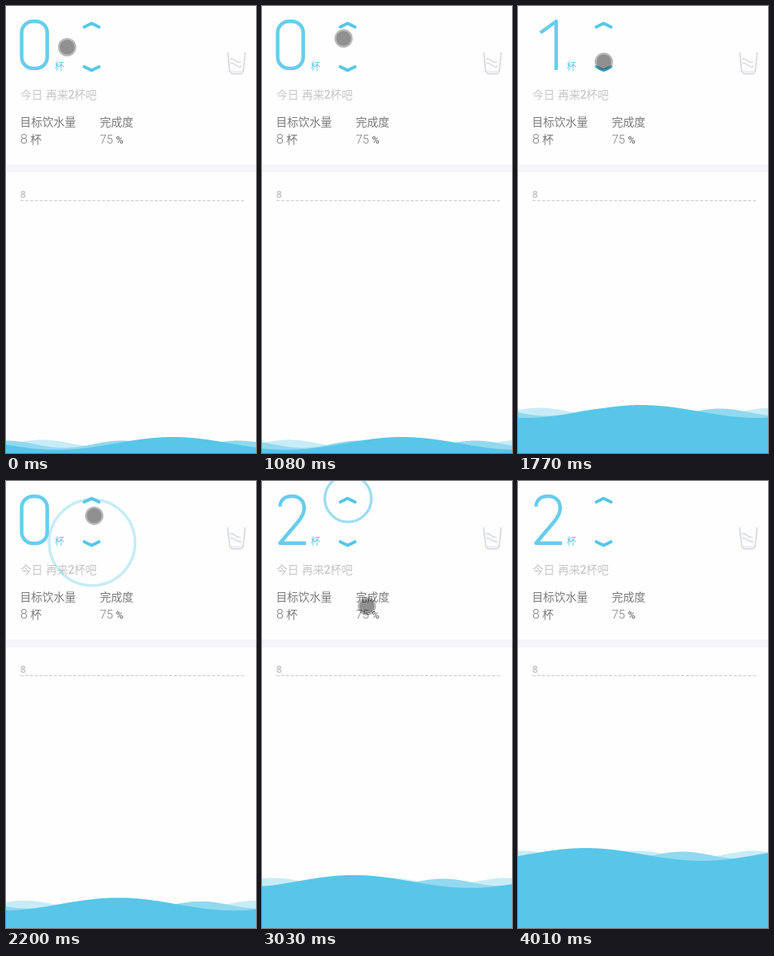
An HTML page with a canvas that plays this animation: 313x559 px, repeating every 4.04 s.

```html
<!DOCTYPE html>
<html lang="zh-CN">
<head>
<meta charset="utf-8">
<title>饮水记录</title>
<style>
  html, body { margin: 0; width: 100%; height: 100%; overflow: hidden; background: #fefefe; }
  canvas { display: block; width: 313px; height: 559px; }
</style>
</head>
<body>
<canvas id="stage"></canvas>
<script>
const W = 313, H = 559, LOOP = 4040;
const BLUE = '#58c6e8', DIGIT = '#68cdec';
const CJK = '"Noto Sans CJK SC", "Noto Sans CJK", sans-serif';
const LATIN = 'Roboto, "Noto Sans", sans-serif';

const canvas = document.getElementById('stage');
const ctx = canvas.getContext('2d');
const dpr = window.devicePixelRatio || 1;
canvas.width = W * dpr;
canvas.height = H * dpr;

// Taps on the stepper arrows: time, change in cups, height of the ripple centre
const taps = [
  { at: 1267, add: 1, y: 22 },
  { at: 1934, add: -1, y: 77 },
  { at: 2450, add: 1, y: 22 },
  { at: 2903, add: 1, y: 22 }
];

// Pointer path: time, x, y
const path = [
  [0, 76, 51], [400, 82, 49], [550, 93, 45.5], [600, 96, 41], [1110, 102, 40],
  [1240, 106, 25], [1320, 106, 25], [1460, 107, 39], [1850, 107, 77],
  [1990, 108, 77], [2200, 110, 43], [2400, 104, 24], [2940, 104, 24],
  [3300, 210, 546.5], [3340, 221, 600]
];

const clamp = v => Math.max(0, Math.min(1, v));
const ease = v => (1 - Math.cos(Math.PI * clamp(v))) / 2;

function text(str, x, y, font, color) {
  ctx.font = font;
  ctx.fillStyle = color;
  ctx.fillText(str, x, y);
}

function line(points, color, width) {
  ctx.beginPath();
  points.forEach(([x, y]) => ctx.lineTo(x, y));
  ctx.strokeStyle = color;
  ctx.lineWidth = width;
  ctx.stroke();
}

function disc(x, y, r, color) {
  ctx.beginPath();
  ctx.arc(x, y, r, 0, 2 * Math.PI);
  ctx.fillStyle = color;
  ctx.fill();
}

function drawDigit(n) {
  ctx.beginPath();
  if (n === 0) {
    ctx.roundRect(19.6, 19.2, 32, 58.8, 14);
  } else if (n === 1) {
    ctx.moveTo(28, 33.5);
    ctx.lineTo(47.8, 19.2);
    ctx.lineTo(47.8, 80);
  } else {
    ctx.moveTo(22.5, 32);
    ctx.bezierCurveTo(23, 23, 29, 19, 37.5, 19);
    ctx.bezierCurveTo(47, 19, 52.8, 25, 52.8, 34);
    ctx.bezierCurveTo(52.8, 40, 50, 45, 46, 50);
    ctx.lineTo(22.5, 77.7);
    ctx.lineTo(55, 77.7);
  }
  ctx.strokeStyle = DIGIT;
  ctx.lineWidth = 4.5;
  ctx.lineJoin = 'round';
  ctx.stroke();
}

function drawGlass() {
  const c = '#dadde8';
  line([[277.5, 58], [280.2, 82], [283, 84.7], [294, 84.7], [297, 82], [299.5, 58]], c, 2);
  line([[281, 82], [296, 82]], '#e8eaf1', 1.5);
  for (const [x, y, len] of [[281, 66, 13], [281, 71.5, 14]]) {
    ctx.beginPath();
    ctx.moveTo(x, y);
    ctx.bezierCurveTo(x + len * 0.5, y - 1, x + len * 0.4, y + 6, x + len, y + 4);
    ctx.lineWidth = 1.8;
    ctx.strokeStyle = c;
    ctx.stroke();
  }
}

function drawPanel(cups) {
  drawDigit(cups);
  text('杯', 61, 79.5, '100 12px ' + CJK, BLUE);

  ctx.lineCap = 'round';
  line([[98, 26.2], [107.2, 21.8], [116.5, 26.2]], BLUE, 3.9);
  line([[98, 76], [107.2, 80.5], [116.5, 76]], BLUE, 3.9);
  ctx.lineCap = 'butt';

  const small = '100 14px ' + CJK, pale = '#c6c6c6', dark = '#7c7c7c';
  text('今日', 18, 116, small, pale);
  text('再来', 50, 116, small, pale);
  text('2', 77.7, 116, '500 14px ' + LATIN, pale);
  text('杯吧', 85.5, 116, small, pale);

  text('目标饮水量', 17.5, 150, small, dark);
  text('完成度', 117.5, 150, small, dark);
  text('8', 18, 172, '300 16px ' + LATIN, dark);
  text('杯', 30.5, 172, small, dark);
  text('75', 117.5, 172, '300 15px ' + LATIN, dark);
  text('%', 137.5, 172, '500 13px ' + LATIN, '#707070');

  drawGlass();

  ctx.fillStyle = '#f5f5fa';
  ctx.fillRect(0, 198, W, 10);

  text('8', 18, 240, '700 12px "Open Sans", sans-serif', '#c6c6c6');
  ctx.setLineDash([4, 2]);
  line([[18, 243.5], [298, 243.5]], '#cccccc', 1);
  ctx.setLineDash([]);
}

function drawWave(level, crest, length, amp, color) {
  ctx.beginPath();
  ctx.moveTo(0, H);
  for (let x = 0; x <= W; x++) {
    ctx.lineTo(x, level - amp * Math.cos(2 * Math.PI * (x - crest) / length));
  }
  ctx.lineTo(W, H);
  ctx.fillStyle = color;
  ctx.fill();
}

function drawWater(t) {
  const level = taps.reduce((y, p) => y - 40 * p.add * ease((t - p.at) / 500), 547);
  drawWave(level, 45 - 0.01 * t, 145, 4.5, '#c8ecf7');
  drawWave(level + 1, 290 - 0.021 * t, 145, 4.5, '#92d9ef');
  drawWave(level, 209 - 0.031 * t, 290, 8, BLUE);
}

function drawRipple(t, tap) {
  const age = t - tap.at, alpha = 0.8 * (1 - age / 460);
  if (age < 0 || alpha <= 0) return;
  ctx.globalAlpha = alpha;
  ctx.beginPath();
  ctx.arc(107.8, tap.y, 6.5 + 0.177 * age, 0, 2 * Math.PI);
  ctx.strokeStyle = BLUE;
  ctx.lineWidth = 3.4;
  ctx.stroke();
  ctx.globalAlpha = 1;
}

function drawPointer(t) {
  const i = path.findIndex(k => k[0] > t);
  if (i < 1) return;
  const [t0, x0, y0] = path[i - 1], [t1, x1, y1] = path[i];
  const k = (t - t0) / (t1 - t0);
  const x = x0 + (x1 - x0) * k, y = y0 + (y1 - y0) * k;
  disc(x + 0.5, y + 0.5, 11.5, 'rgba(0,0,0,.27)');
  disc(x + 0.5, y + 0.5, 9.3, 'rgba(0,0,0,.22)');
}

function draw(t) {
  ctx.setTransform(dpr, 0, 0, dpr, 0, 0);
  ctx.fillStyle = '#fefefe';
  ctx.fillRect(0, 0, W, H);
  const cups = taps.reduce((n, p) => n + (t >= p.at ? p.add : 0), 0);
  drawPanel(cups);
  drawWater(t);
  taps.forEach(p => drawRipple(t, p));
  drawPointer(t);
}

const start = performance.now();
function tick() {
  draw((performance.now() - start) % LOOP);
  requestAnimationFrame(tick);
}
tick();
</script>
</body>
</html>
```
